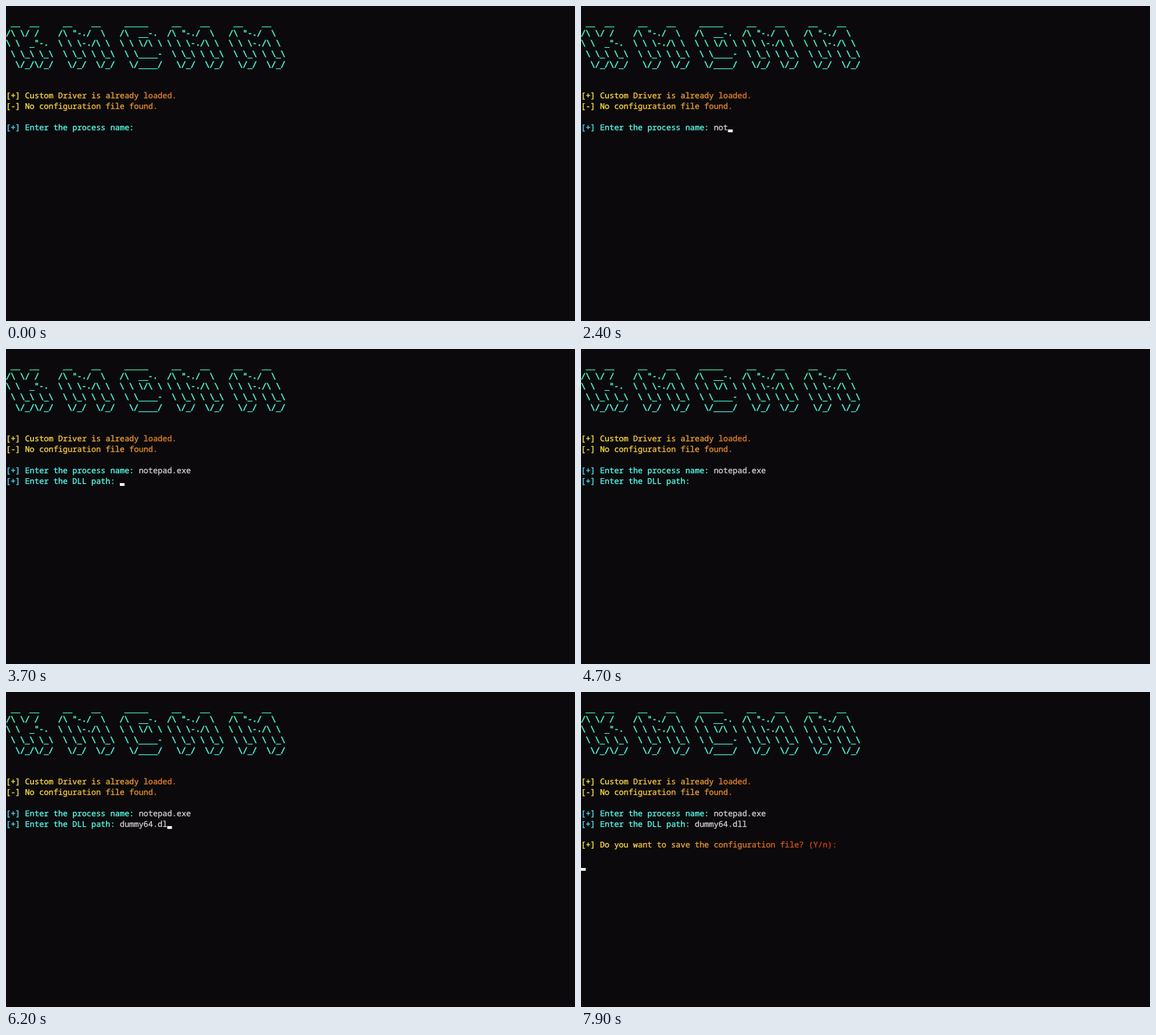
An HTML page that plays this animation: 800 by 444 pixels, repeating every 8 s.

```html
<!DOCTYPE html>
<html lang="en">
<head>
<meta charset="utf-8">
<title>Terminal session</title>
<style>
html, body { margin: 0; width: 100%; height: 100%; overflow: hidden; background: #0b090b; }
svg { display: block; width: 800px; height: 444px; }
text {
  font: 11.11px "Noto Sans Mono", "DejaVu Sans Mono", monospace;
  white-space: pre;
  text-rendering: geometricPrecision;
  font-variant-ligatures: none;
  stroke-width: .3px;
}
.banner { font: 11.07px "DejaVu Sans Mono", monospace; stroke-width: .5px; }
</style>
</head>
<body>
<svg id="stage" viewBox="0 0 800 444">
  <defs>
    <linearGradient id="fire" gradientUnits="userSpaceOnUse" x1="0" x2="360" y1="0" y2="0">
      <stop offset="0" stop-color="#fff24a"/>
      <stop offset=".33" stop-color="#f5b83c"/>
      <stop offset=".66" stop-color="#dd7224"/>
      <stop offset="1" stop-color="#d0300f"/>
    </linearGradient>
    <linearGradient id="water" gradientUnits="userSpaceOnUse" x1="0" x2="180" y1="0" y2="0">
      <stop offset="0" stop-color="#52d8f8"/>
      <stop offset=".2" stop-color="#54fbf0"/>
      <stop offset="1" stop-color="#58ffe8"/>
    </linearGradient>
    <linearGradient id="mint" gradientUnits="userSpaceOnUse" x1="0" x2="0" y1="20" y2="88">
      <stop offset="0" stop-color="#46f8b8"/>
      <stop offset="1" stop-color="#4cfbec"/>
    </linearGradient>
  </defs>
  <rect width="800" height="444" fill="#0b090b"/>
</svg>
<script>
const LOOP = 8000, STEP = 100, BLINK = 530, BLINK_SHIFT = 60;
const CELL = 6.667, ROW = 14.82, BASELINE = 11.9, CURSOR_HEIGHT = 4;
const FIRE = "url(#fire)", WATER = "url(#water)", MINT = "url(#mint)", INPUT = "#d2d2d2";
const stage = document.getElementById("stage");

function add(tag, attributes) {
  const node = document.createElementNS("http://www.w3.org/2000/svg", tag);
  for (const key in attributes) node.setAttribute(key, attributes[key]);
  return stage.appendChild(node);
}

function print(row, col, string, color, className = "") {
  const node = add("text", {
    x: col * CELL, y: row * ROW + BASELINE, fill: color, stroke: color, class: className
  });
  node.textContent = string;
  return node;
}

const show = (node, visible) => node.setAttribute("visibility", visible ? "visible" : "hidden");

const K = [" __  __    ", "/\\ \\/ /    ", "\\ \\  _\"-.  ", " \\ \\_\\ \\_\\ ", "  \\/_/\\/_/ "];
const M = [" __    __    ", "/\\ \"-./  \\   ", "\\ \\ \\-./\\ \\  ", " \\ \\_\\ \\ \\_\\ ", "  \\/_/  \\/_/ "];
const D = [" _____    ", "/\\  __-.  ", "\\ \\ \\/\\ \\ ", " \\ \\____- ", "  \\/____/ "];
K.forEach((_, i) => print(i + 1, 0, [K, M, D, M, M].map(g => g[i]).join(""), MINT, "banner"));

print(8, 0, "[+] Custom Driver is already loaded.", FIRE);
print(9, 0, "[-] No configuration file found.", FIRE);

// Each prompt appears at `from`; typing begins at `start`, one key every `pace` ms.
const prompts = [
  { row: 11, label: "[+] Enter the process name: ", color: WATER, answer: "notepad.exe", from: 0, start: 2100, pace: 115 },
  { row: 12, label: "[+] Enter the DLL path: ", color: WATER, answer: "dummy64.dll", from: 3500, start: 5000, pace: 130 },
  { row: 14, label: "[+] Do you want to save the configuration file? (Y/n): ", color: FIRE, answer: "", from: 6800, start: 0, pace: 1 },
  { row: 16, label: "", color: INPUT, answer: "", from: 7700, start: 0, pace: 1 }
];
for (const p of prompts) {
  p.labelNode = print(p.row, 0, p.label, p.color);
  p.answerNode = print(p.row, p.label.length, "", INPUT);
}
const cursor = add("rect", { width: CELL, height: CURSOR_HEIGHT, fill: "#f2f2f2" });

function render(t) {
  let current, count, lastKey = -Infinity;
  for (const p of prompts) {
    const active = t >= p.from;
    show(p.labelNode, active);
    const typed = Math.max(0, Math.min(p.answer.length, Math.floor((t - p.start) / p.pace) + 1));
    p.answerNode.textContent = active ? p.answer.slice(0, typed) : "";
    if (!active) continue;
    current = p;
    count = typed;
    if (p.from) lastKey = p.from;
    if (typed) lastKey = p.start + (typed - 1) * p.pace;
  }
  // A key press keeps the cursor lit until the next blink tick.
  const tick = Math.floor((t + BLINK_SHIFT) / BLINK);
  const lit = tick % 2 === 1 || lastKey >= tick * BLINK - BLINK_SHIFT;
  cursor.setAttribute("x", (current.label.length + count) * CELL);
  cursor.setAttribute("y", Math.round((current.row + 1) * ROW) - CURSOR_HEIGHT);
  show(cursor, lit);
}

const origin = performance.now();
function loop() {
  const t = (performance.now() - origin) % LOOP;
  render(Math.floor(t / STEP) * STEP);
  requestAnimationFrame(loop);
}
loop();
</script>
</body>
</html>
```
